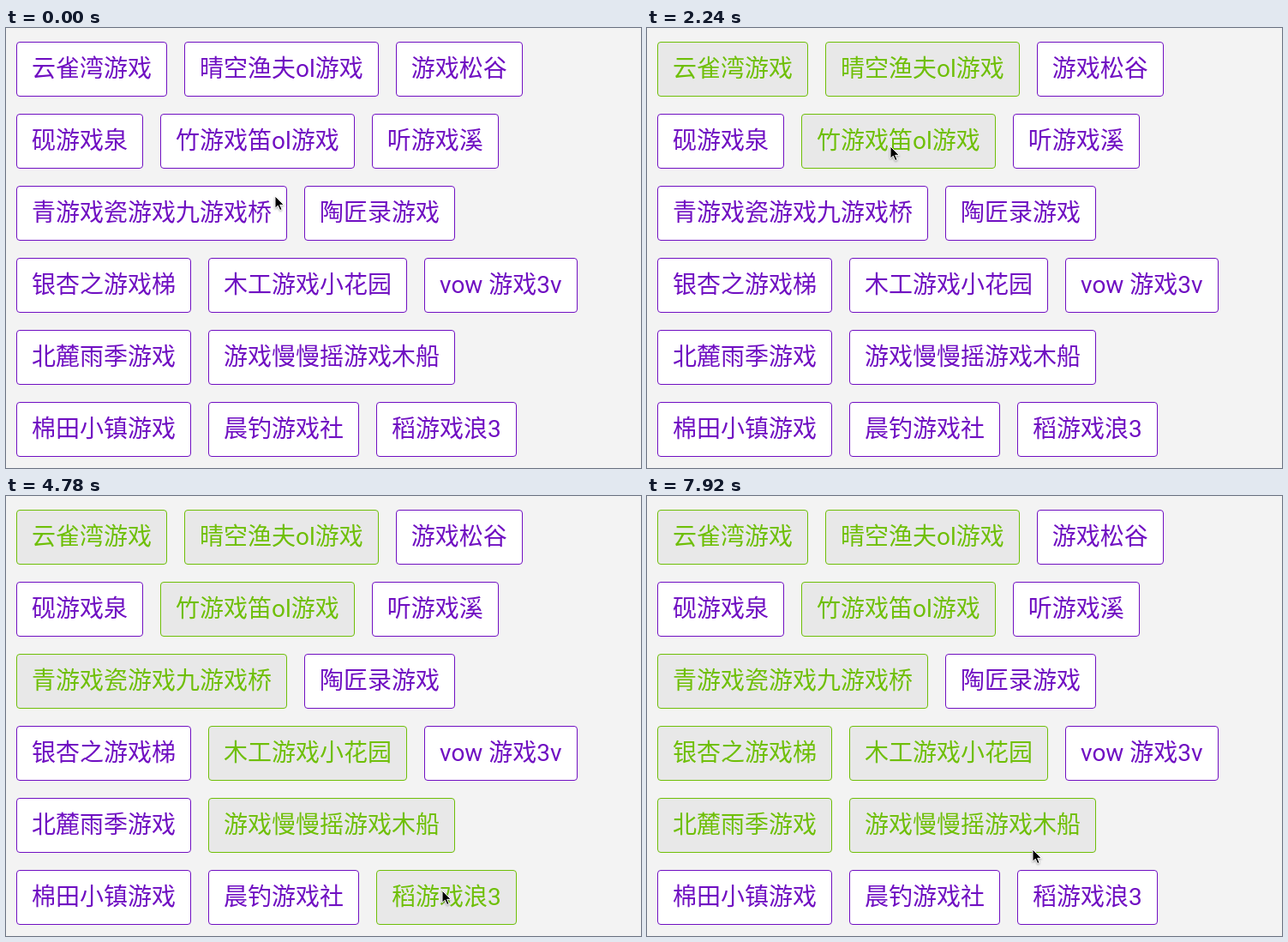
An HTML page for the animation above (8 s loop, 741 px wide and 513 px high).

```html
<!DOCTYPE html>
<html lang="zh-CN">
<head>
<meta charset="utf-8">
<style>
  html, body { margin: 0; width: 100%; height: 100%; overflow: hidden; background: #f3f3f3; }
  #tags { position: absolute; left: 12px; top: 16px; display: grid; gap: 20px; }
  .row { display: flex; gap: 20px; }
  .tag {
    padding: 0 17px; border: 1px solid; border-radius: 4px; white-space: pre;
    font: 28px/62px Roboto, "Noto Sans CJK SC", "Noto Sans CJK", sans-serif;
    color: #7010c2; background: #fff;
  }
  .tag.on { color: #6fbf08; background: #e8e8e8; }
  #cursor { position: absolute; left: 0; top: 0; overflow: visible; filter: drop-shadow(0 1px 1px #0005); }
</style>
</head>
<body>
<div id="tags"></div>
<svg id="cursor" width="14" height="20">
  <path d="M1 1V15.2L4.3 12.2L6.7 17.6L9.1 16.5L6.7 11.3H11.3Z" fill="#000" stroke="#fff"/>
</svg>
<script>
const LOOP = 8000, STEP = 149.4;

const rows = [
  ["云雀湾游戏", "晴空渔夫ol游戏", "游戏松谷"],
  ["砚游戏泉", "竹游戏笛ol游戏", "听游戏溪"],
  ["青游戏瓷游戏九游戏桥", "陶匠录游戏"],
  ["银杏之游戏梯", "木工游戏小花园", "vow 游戏3v"],
  ["北麓雨季游戏", "游戏慢慢摇游戏木船"],
  ["棉田小镇游戏", "晨钓游戏社", "稻游戏浪3"]
];

// The cursor starts at the first stop and clicks at each of the others
const stops = [
  [313, 195], [113, 52], [361, 63], [283, 137], [240, 212], [339, 292], [368, 378],
  [508, 459], [103, 365], [113, 300], [648, 495], [496, 472], [449, 411]
];

// Times below are counted in steps
const clickAt = i => i ? 5.9 + (i - 1) * 13 / 3 : 0;
const REST = 0.45, TRAVEL = 2.65;

function addElement(parent, className, text = "") {
  const element = document.createElement("div");
  element.className = className;
  element.textContent = text;
  parent.append(element);
  return element;
}

const board = document.getElementById("tags");
const cursor = document.getElementById("cursor");
const tags = rows.flatMap(labels => {
  const row = addElement(board, "row");
  return labels.map(label => addElement(row, "tag", label));
});

const ease = p => p * p * (3 - 2 * p);
const clamp = p => Math.max(0, Math.min(1, p));

function cursorAt(step) {
  return [0, 1].map(axis => Math.round(stops.reduce((position, stop, i) => {
    const p = clamp((step - clickAt(i - 1) - REST) / TRAVEL);
    return position + (stop[axis] - position) * ease(p);
  }, stops[0][axis])));
}

function isOn(tag, step) {
  const box = tag.getBoundingClientRect();
  const hits = stops.filter(([x, y], i) => i > 0 && clickAt(i) <= step &&
    x > box.left && x < box.right && y > box.top && y < box.bottom);
  return hits.length % 2 === 1;
}

function draw(time) {
  const step = Math.floor((time + 10) / STEP);
  for (const tag of tags) tag.classList.toggle("on", isOn(tag, step));
  const [x, y] = cursorAt(step);
  cursor.style.transform = `translate(${x}px, ${y}px)`;
}

const begin = performance.now();
function tick() {
  draw((performance.now() - begin) % LOOP);
  requestAnimationFrame(tick);
}
tick();
</script>
</body>
</html>
```
